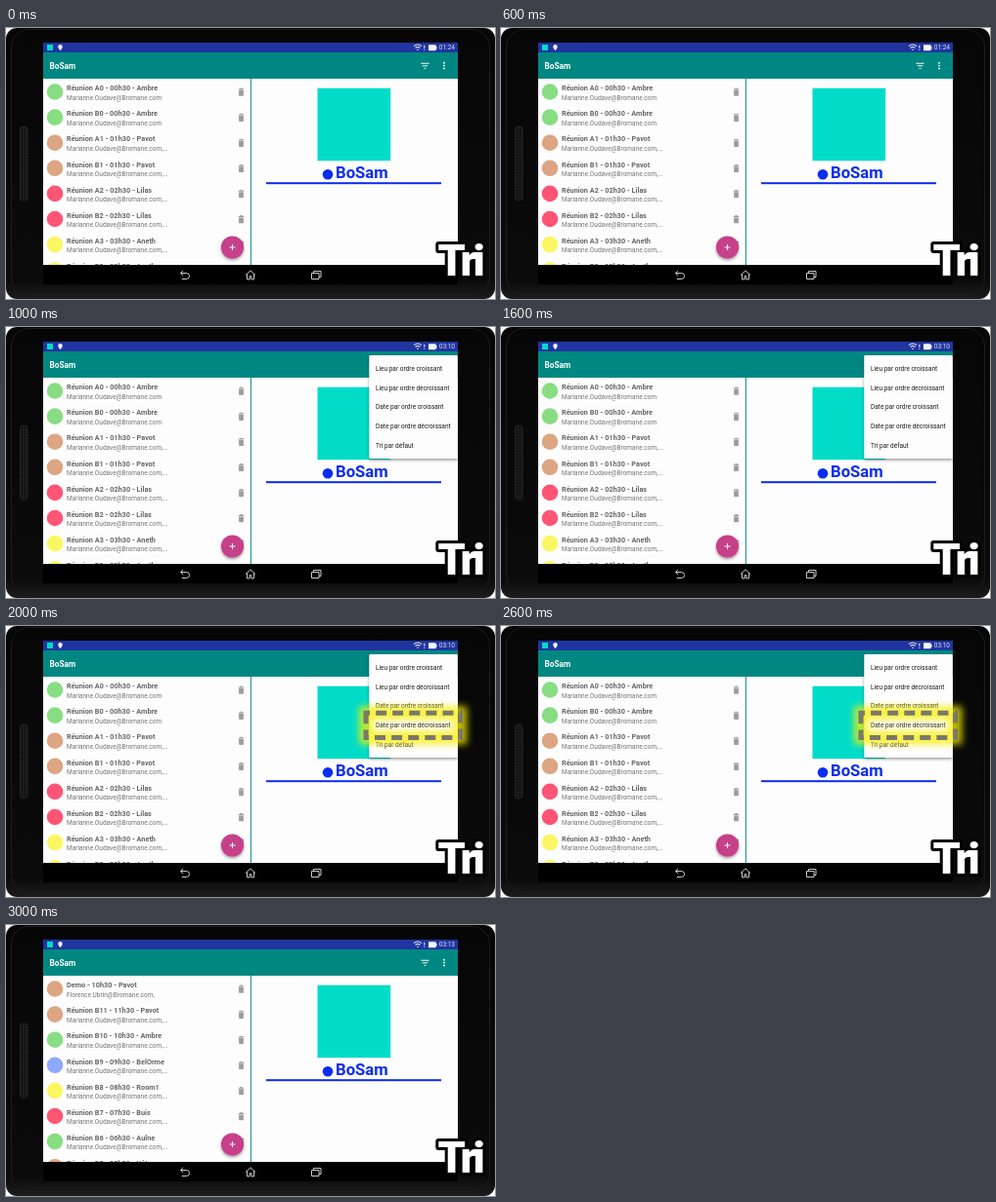
Recreate the animation shown at these times as an HTML page. Size 500 px wide and 278 px high, loop 4000 ms.

```html
<!DOCTYPE html>
<html lang="fr">
<head>
<meta charset="utf-8">
<style>
  html, body { margin: 0; width: 100%; height: 100%; overflow: hidden; background: #fff; }
  svg { display: block; width: 500px; height: 278px; font-family: Roboto, Arial, sans-serif; }
  .name { font-weight: 700; font-size: 7.3px; fill: #666; }
  .mail { font-size: 6.5px; fill: #747474; }
  .item { font-size: 6.5px; fill: #1c1c1c; }
  .line { fill: none; stroke: #f4f4f4; }
  .nav { fill: none; stroke: #d4d4d4; }
  .brand { font-weight: 700; }
  .tri { font-weight: 900; font-size: 45px; letter-spacing: -4px; fill: #fff;
         stroke: #000; stroke-width: 6px; stroke-linejoin: round; paint-order: stroke; }
</style>
</head>
<body>
<svg viewBox="0 0 500 278">
  <defs>
    <linearGradient id="body" x2="0" y2="1">
      <stop offset="0" stop-color="#060606"/>
      <stop offset=".93" stop-color="#0b0b0b"/>
      <stop offset="1" stop-color="#1c1c1c"/>
    </linearGradient>
    <pattern id="mesh" width="3" height="3" patternUnits="userSpaceOnUse">
      <rect width="3" height="3" fill="#1e1e1e"/>
      <circle cx="1.5" cy="1.5" r=".9" fill="#080808"/>
    </pattern>
    <clipPath id="pane"><rect x="38" y="52" width="212" height="191"/></clipPath>
    <clipPath id="screen"><rect x="38" y="15" width="424" height="228"/></clipPath>
    <filter id="shade" x="-30%" y="-30%" width="160%" height="160%">
      <feDropShadow dx="0" dy="1.5" stdDeviation="1.8" flood-opacity=".4"/>
    </filter>
    <filter id="blur" x="-30%" y="-80%" width="160%" height="260%">
      <feGaussianBlur stdDeviation="3.6"/>
    </filter>
    <g id="bin" fill="#9c9c9c">
      <path d="M-2.8-3.1h1.4l.5-.8h1.8l.5.8h1.4v1h-5.6z"/>
      <path d="M-2.4-1.6h4.8v5q0 .9-.9.9h-3q-.9 0-.9-.9z"/>
    </g>
  </defs>

  <rect width="500" height="278" rx="11" fill="url(#body)"/>
  <rect x="5.5" y="1.5" width="489" height="272" rx="18" fill="none" stroke="#1d1d1d"/>
  <rect x="14.5" y="101" width="7.500" height="76" rx="3" fill="url(#mesh)" stroke="#2a2a2a" stroke-width=".7"/>

  <rect x="38" y="15" width="424" height="248" fill="#000"/>
  <rect x="38" y="52" width="424" height="191" fill="#fdfdfd"/>
  <rect x="38" y="15" width="424" height="10" fill="#2035a0"/>
  <rect x="38" y="25" width="424" height="27" fill="#008782"/>

  <!-- status bar -->
  <rect x="42" y="17" width="6" height="6" fill="#00dcc8"/>
  <path d="M55.5 23.3q-2.3-2.7-2.3-4a2.3 2.3 0 0 1 4.6 0q0 1.3-2.3 4z" fill="#eef"/>
  <path d="M417 18.6q4-3.200 8 0M418.600 20.500q2.400-2 4.800 0M420.200 22.300h1.600" class="line" stroke-width="1.100"/>
  <path d="M427.300 17.800h1v3h-1zM427.300 21.800h1v1h-1zM432 17.300h7.500v1.500h1v3h-1v1.500h-7.500z" fill="#f4f4ff"/>
  <text id="clock" x="442.800" y="22.400" font-size="6.500" fill="#dde"></text>

  <!-- toolbar -->
  <text class="brand" x="44.500" y="41.600" font-size="8.300" fill="#fff">BoSam</text>
  <path class="line" d="M424.300 36.200h8.400M425.800 38.700h5.400M427.500 41.200h2" stroke-width="1.100"/>
  <g fill="#fff">
    <circle cx="448" cy="35.700" r=".95"/><circle cx="448" cy="38.600" r=".95"/><circle cx="448" cy="41.500" r=".95"/>
  </g>

  <g id="lists" clip-path="url(#pane)"></g>
  <rect x="249.800" y="52" width="1.200" height="191" fill="#2d9a9a"/>
  <g filter="url(#shade)"><circle cx="231.500" cy="225" r="11.600" fill="#c6418a"/></g>
  <path class="line" d="M228.500 225h6M231.500 222v6" stroke-width="1.100"/>

  <!-- detail pane -->
  <rect x="318.500" y="61.700" width="74.700" height="74.500" fill="#00dcc8"/>
  <circle cx="329" cy="150.300" r="5.300" fill="#0a2cf0"/>
  <text class="brand" x="337" y="154.300" font-size="16.700" fill="#0a2cf0">BoSam</text>
  <rect x="266" y="158.200" width="179" height="2" fill="#0a2cf0"/>

  <!-- navigation -->
  <g class="nav" stroke-width=".95">
    <path d="M181.200 249l-2.700 2.500 2.700 2.500M178.800 251.500h5.500q3.300 0 3.300 3t-3.300 3h-4.500"/>
    <path d="M245 253.500l5-4.700 5 4.700M246.500 252.400v5.500h2.600v-3.200h1.800v3.200h2.600v-5.500"/>
    <path d="M312.500 251.500h7.500v6h-7.500zM314.500 251.500v-2h7.500v6h-2"/>
  </g>

  <g id="menu" clip-path="url(#screen)">
    <rect x="371.300" y="29" width="90.500" height="106" rx="1" fill="#fdfdfd" filter="url(#shade)"/>
  </g>
  <g id="mark" fill="none">
    <rect x="368" y="89.300" width="96.500" height="25.200" stroke="#f8ee00" stroke-width="14" opacity=".76" filter="url(#blur)"/>
    <rect x="368" y="89.300" width="96.500" height="25.200" stroke="#7b7869" stroke-width="5" stroke-dasharray="11 6.100" stroke-dashoffset="7"/>
  </g>
  <text class="tri" x="441.500" y="253.500">Tri</text>
</svg>
<script>
const $ = id => document.getElementById(id);

function add(parent, tag, attrs, text = '') {
  const el = document.createElementNS('http://www.w3.org/2000/svg', tag);
  for (const key in attrs) el.setAttribute(key, attrs[key]);
  el.textContent = text;
  return parent.appendChild(el);
}

const colors = {
  Ambre: '#88dd82', Pavot: '#dda582', Lilas: '#ff5575', Aneth: '#fbf663', BelOrme: '#8fa9ff',
  Room1: '#fbf663', Buis: '#ff5575', Aulne: '#88dd82', 'Hêtre': '#dda582'
};
const host = 'Marianne.Oudave@Bromane.com';
const guest = 'Florence.Ubrin@Bromane.com,';

function makeList(rows) {
  const list = add($('lists'), 'g', {});
  rows.forEach(([title, time, room, mail = host + ',...'], i) => {
    const row = add(list, 'g', { transform: `translate(0 ${65.5 + i * 26.1})` });
    add(row, 'circle', { cx: 50, r: 8.3, fill: colors[room] });
    add(row, 'text', { class: 'name', x: 62, y: -1.3 }, `${title} - ${time} - ${room}`);
    add(row, 'text', { class: 'mail', x: 62, y: 8.2 }, mail);
    add(row, 'use', { href: '#bin', x: 240.5, y: 0 });
  });
  return list;
}

const byDefault = makeList(['Ambre', 'Pavot', 'Lilas', 'Aneth'].flatMap((room, i) =>
  ['A', 'B'].map(s => [`Réunion ${s}${i}`, `0${i}h30`, room, i ? undefined : host])));

const byDate = makeList([
  ['Demo', '10h30', 'Pavot', guest],
  ...['Pavot', 'Ambre', 'BelOrme', 'Room1', 'Buis', 'Aulne', 'Hêtre'].map((room, i) =>
    [`Réunion B${11 - i}`, String(11 - i).padStart(2, '0') + 'h30', room])
]);

['Lieu par ordre croissant', 'Lieu par ordre décroissant', 'Date par ordre croissant',
 'Date par ordre décroissant', 'Tri par défaut'].forEach((label, i) =>
  add($('menu'), 'text', { class: 'item', x: 378, y: 44.8 + i * 19.75 }, label));

const clocks = ['01:24', '03:10', '03:10', '03:13'];
const show = (el, on) => el.style.display = on ? '' : 'none';

function draw() {
  const step = Math.floor(performance.now() / 1000) % 4;
  $('clock').textContent = clocks[step];
  show(byDefault, step < 3);
  show(byDate, step === 3);
  show($('menu'), step === 1 || step === 2);
  show($('mark'), step === 2);
  requestAnimationFrame(draw);
}
draw();
</script>
</body>
</html>
```
